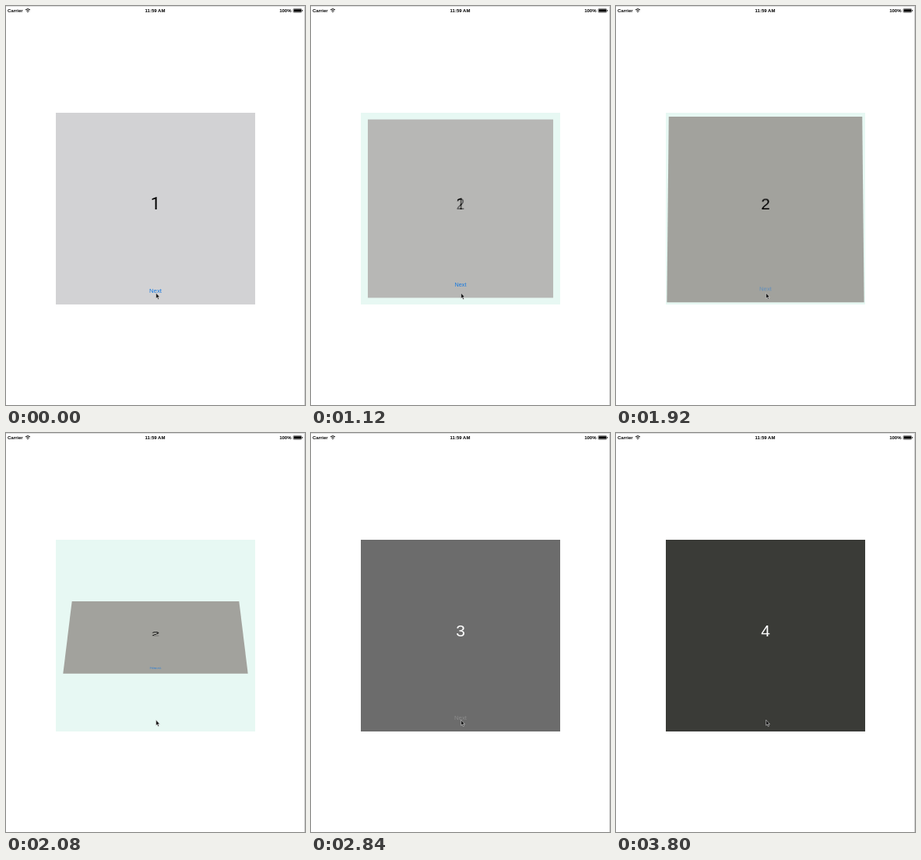
Recreate the animation shown at these times as an HTML page. Size 384 by 512 pixels, loop 5.04 s.

```html
<!DOCTYPE html>
<html lang="en">
<head>
<meta charset="utf-8">
<title>Card transitions</title>
<style>
html, body { margin: 0; width: 100%; height: 100%; overflow: hidden; background: #fff; }
#stage {
  position: absolute; left: 0; top: 0; width: 384px; height: 512px; overflow: hidden;
  background: #fff; font-family: "Liberation Sans", Arial, sans-serif;
}
#edge {
  position: absolute; inset: 0; box-sizing: border-box;
  border-top: 1px solid #dcdcdc; border-right: 1px solid #ccc;
}
.status { position: absolute; top: 2px; font: bold 6px/8px "Liberation Sans", Arial, sans-serif; white-space: nowrap; }
svg { position: absolute; left: 0; top: 0; }
#box {
  position: absolute; left: 64px; top: 137px; width: 256px; height: 246px;
  overflow: hidden; background: #e7f8f3; perspective: 1950px;
}
.card { position: absolute; inset: 0; text-align: center; }
.card b, .card span { position: absolute; left: 0; width: 100%; }
.card b { top: 104px; font-weight: normal; font-size: 21px; line-height: 26px; }
.card span { top: 224px; font-size: 7.8px; line-height: 10px; }
.card:first-child b { font-family: Roboto, sans-serif; font-size: 22px; }
</style>
</head>
<body>
<div id="stage">
  <div id="edge"></div>
  <div class="status" style="left:2px">Carrier</div>
  <div class="status" style="left:0;width:383px;text-align:center">11:59 AM</div>
  <div class="status" style="right:17.5px">100%</div>
  <div id="box"></div>
  <svg width="384" height="512">
    <g fill="none" stroke="#000" stroke-width="1">
      <path d="M25 4.9Q28 2.3 31 4.9M26.3 6.3Q28 4.9 29.7 6.3"/>
      <rect x="369" y="3.6" width="10.6" height="4.6" rx=".8" stroke-width=".5"/>
    </g>
    <path d="M26.9 7.2h2.2L28 8.4zM369.6 4.2h9.4v3.4h-9.4zM380.2 5h.8v1.8h-.8z"/>
    <path d="M192.7 368.2v7l1.5-1.3 1.1 2.6 1.2-.5-1.1-2.5h2.1z" fill="#111" stroke="#ddd" stroke-width=".6"/>
  </svg>
</div>
<script>
const LOOP = 5040;
const BLUE = '#1478e0';
const box = document.getElementById('box');

// background, digit colour, link colour, press time
const cards = [
  ['#d2d2d4', '#000', BLUE, 720],
  ['#a2a29d', '#000', BLUE, 1720],
  ['#6c6c6c', '#fff', '#fff', 2840],
  ['#3a3b37', '#fff', '', LOOP]
].map(([bg, ink, link, press], i) => {
  const el = document.createElement('div');
  el.className = 'card';
  el.style.background = bg;
  el.style.color = ink;
  el.innerHTML = `<b>${i + 1}</b>` + (link && `<span style="color:${link}">Next</span>`);
  box.append(el);
  return { el, press, label: el.querySelector('span') };
});

const clamp = x => Math.min(1, Math.max(0, x));
const ease = x => x * x * (3 - 2 * x);
const progress = (t, start, length) => ease(clamp((t - start) / length));

function show(i, opacity, transform = 'none') {
  const { style } = cards[i].el;
  style.visibility = opacity > 0 ? 'visible' : 'hidden';
  style.opacity = opacity;
  style.transform = transform;
}

// Shrink back, swap, grow forward
function dip(p) {
  const scale = `scale(${1 - 0.072 * Math.sin(Math.PI * p)})`;
  show(0, p < 1 ? 1 : 0, scale);
  show(1, clamp((p - 0.3) / 0.5), scale);
}

// Turn about the horizontal axis, pushed back halfway
function flip(p) {
  const s = 1 - 0.132 * Math.sin(Math.PI * p);
  const turn = deg => `scale3d(${s},${s},${s}) rotateX(${deg}deg)`;
  show(1, p < 0.5 ? 1 : 0, turn(180 * p));
  show(2, p < 0.5 ? 0 : 1, turn(180 * p - 180));
}

function dissolve(p) {
  show(2, p < 1 ? 1 : 0);
  show(3, p);
}

function draw(t) {
  cards.forEach(({ press, label }, i) => {
    show(i, 0);
    if (label) label.style.opacity = t < press ? 1 : 0.2 + 0.8 * clamp((t - press - 100) / 300);
  });
  if (t < 1720) dip(progress(t, 830, 530));
  else if (t < 2840) flip(progress(t, 1842, 590));
  else dissolve(progress(t, 2880, 440));
}

const begin = performance.now();
function tick() {
  draw((performance.now() - begin) % LOOP);
  requestAnimationFrame(tick);
}
tick();
</script>
</body>
</html>
```
